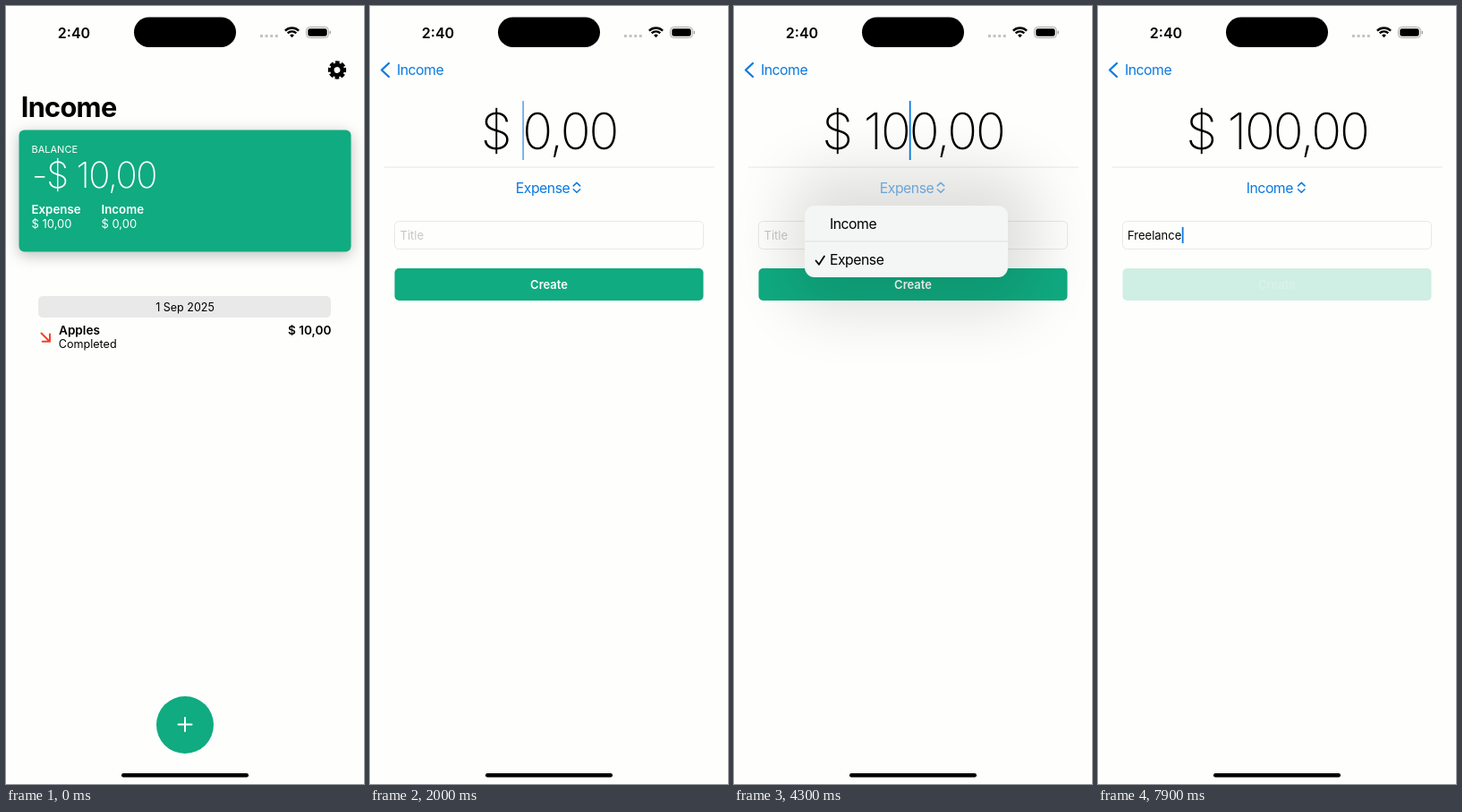
Write an HTML page that moves like this. It is 400x869 px and loops after 8000 ms.

```html
<!DOCTYPE html>
<html lang="en">
<head>
<meta charset="utf-8">
<title>Adding an income</title>
<style>
html, body { margin: 0; height: 100%; overflow: hidden; background: #fefefc; }
svg { display: block; width: 100vw; height: 100vh; }
text { font: 13px Inter, "Liberation Sans", sans-serif; white-space: pre; }
.semi { font-weight: 600; }
.body { font-size: 15.8px; letter-spacing: -.5px; }
.thin { font-weight: 200; letter-spacing: -.036em; }
.mid { text-anchor: middle; }
.end { text-anchor: end; }
.line { fill: none; stroke-linecap: round; stroke-linejoin: round; }
.green { fill: #10ab80; }
.blue { fill: #0a7ae0; }
.blueLine { stroke: #0a7ae0; }
#card { filter: drop-shadow(0 4px 8px rgba(0, 0, 0, .25)); }
#glow { filter: blur(34px); }
</style>
</head>
<body>
<svg viewBox="0 0 400 869">
  <g id="list">
    <rect id="listBack" width="520" height="869"/>
    <rect id="card" class="green" x="14.5" y="138.5" width="371" height="136" rx="6"/>
    <g fill="#fff">
      <text x="28.5" y="163.5" style="font-size:11px">BALANCE</text>
      <text class="thin" x="28.8" y="203" style="font-size:40px;font-weight:250">-$ 10,00</text>
      <text class="semi" x="28.5" y="232" style="font-size:13.3px">Expense</text>
      <text class="semi" x="106.5" y="232" style="font-size:13.3px">Income</text>
      <text x="28.5" y="248">$ 10,00</text>
      <text x="106.5" y="248">$ 0,00</text>
    </g>
    <rect id="dateBack" x="36" y="324" width="327" height="24" rx="5"/>
    <text class="mid" x="200" y="340.5" style="font-size:12.5px">1 Sep 2025</text>
    <path class="line" d="M39.5 365.5l9 9M49 366.5v8.3h-8.3" stroke="#f4422c" stroke-width="2"/>
    <text class="semi" x="59" y="367" style="font-size:13.6px">Apples</text>
    <text x="58.7" y="382" style="font-size:12.6px">Completed</text>
    <text class="semi end" x="363.5" y="367" style="font-size:13.6px">$ 10,00</text>
    <circle class="green" cx="200" cy="803" r="32"/>
    <path id="plus" class="line" d="M192.5 802.5h15M200 795v15" stroke="#fff" stroke-width="2"/>
  </g>

  <g id="form">
    <rect width="400" height="869" fill="#fefefc"/>
    <text id="amount" class="thin mid" x="200" y="159.5" style="font-size:56px"></text>
    <rect id="amountCaret" class="blue" y="106" width="1.8" height="66"/>
    <path d="M16 180H385" stroke="#e6e6e4"/>
    <g id="picker">
      <text id="kind" class="body blue" y="208.5"></text>
      <path id="arrows" class="line blueLine" d="M-3.7-1.9L0-5.4 3.7-1.9M-3.7 1.9L0 5.4 3.7 1.9" stroke-width="1.5"/>
    </g>
    <rect x="27.5" y="240.5" width="345" height="31" rx="5" fill="none" stroke="#e8e8e6"/>
    <text id="hint" x="33.5" y="260.5" fill="#c6c6c5">Title</text>
    <text id="title" x="33" y="260.5"></text>
    <rect id="titleCaret" class="blue" y="247" width="1.8" height="18"/>
    <rect id="button" x="27.5" y="293" width="345" height="36" rx="5"/>
    <text id="create" class="semi mid" x="200" y="316">Create</text>
    <rect id="glow" x="62" y="185" width="276" height="156" rx="40"/>
    <g id="menu">
      <rect x="79" y="223" width="227" height="80" rx="11" fill="#f4f5f5"/>
      <path d="M79 263H306" stroke="#e0e1e1"/>
      <text class="body" x="107" y="249">Income</text>
      <text class="body" x="107" y="289">Expense</text>
      <path class="line" d="M91.5 284.5l3.4 4.2 6-9.2" stroke="#000" stroke-width="1.8"/>
    </g>
  </g>

  <g id="gear" transform="translate(370 71.5) rotate(-15.1)" fill="none" stroke="#000">
    <circle r="5.7" stroke-width="4.6"/>
    <circle r="8.7" stroke-width="3" stroke-dasharray="4.6 2.233"/>
  </g>
  <path id="back" class="line blueLine" d="M21 64L13 71.5 21 79" stroke-width="2.3"/>
  <text id="bigName" style="font-size:30.7px;font-weight:700;letter-spacing:-.7px">Income</text>
  <text id="backName" class="body blue">Income</text>

  <text class="semi mid" x="76" y="35.5" style="font-size:16px">2:40</text>
  <rect x="143" y="12.5" width="114" height="33.5" rx="16.75"/>
  <path d="M284 33.5H304" stroke="#c4c4c2" stroke-width="3" stroke-dasharray="3 2.6"/>
  <path d="M311.9 27.6A10.8 10.8 0 0 1 327.1 27.6M314.7 30.4A6.8 6.8 0 0 1 324.3 30.4" fill="none" stroke="#000" stroke-width="2.4"/>
  <path d="M319.5 35.2L317.1 32.8A3.4 3.4 0 0 1 321.9 32.8Z"/>
  <rect x="335.5" y="23.5" width="25" height="12" rx="4" fill="none" stroke="#a8a8a6"/>
  <rect x="337.3" y="25.2" width="21.4" height="8.6" rx="2.4"/>
  <path d="M362.3 27.7v3.6" stroke="#a8a8a6" stroke-width="1.4"/>
  <rect id="home" x="129" y="857" width="142" height="4.5" rx="2.25"/>
</svg>
<script>
const LOOP = 8000;
const ui = Object.fromEntries([...document.querySelectorAll("svg [id]")].map(e => [e.id, e]));

const clamp = v => Math.min(1, Math.max(0, v));
const ramp = (t, from, to) => clamp((t - from) / (to - from));
const mix = (a, b, k) => a + (b - a) * k;
const mixColor = (a, b, k) => `rgb(${a.map((v, i) => Math.round(mix(v, b[i], k)))})`;
// Critically damped spring from 0 to 1.
const spring = (t, start, rate) => {
  const k = Math.max(0, t - start) * rate;
  return 1 - (1 + k) * Math.exp(-k);
};
const set = (el, attrs) => {
  for (const name in attrs) el.setAttribute(name, attrs[name]);
};
const write = (el, text) => {
  if (el.textContent !== text) el.textContent = text;
};

function drawPush(t) {
  const push = spring(t, 542, .0185);
  const name = spring(t, 551, .0185);
  set(ui.list, { transform: `translate(${-120 * push})` });
  set(ui.form, { transform: `translate(${400 * (1 - push)})` });
  const dim = Math.sqrt(push);
  set(ui.listBack, { fill: mixColor([254, 254, 252], [230, 230, 229], dim) });
  set(ui.dateBack, { fill: mixColor([233, 233, 233], [210, 210, 211], dim) });
  set(ui.plus, { opacity: mix(1, .4, ramp(t, 450, 500)) });
  set(ui.gear, { opacity: clamp(1 - push * .8 - ramp(push, .5, .9)) });
  set(ui.back, { opacity: ramp(push, .4, .95) });

  const place = `translate(${mix(16.8, 30, name)} ${mix(124, 77, name)})`;
  const size = mix(1, .49, name);
  set(ui.bigName, {
    transform: `${place} scale(${size})`,
    fill: mixColor([0, 0, 0], [60, 110, 190], ramp(name, 0, .6)),
    opacity: 1 - ramp(name, .4, .9)
  });
  set(ui.backName, { transform: `${place} scale(${size / .49})`, opacity: ramp(name, .4, .9) });
  set(ui.home, { fill: t > 540 && t < 1600 ? "#555" : "#000" });
}

function drawAmount(t) {
  const typed = (t >= 2700) + (t >= 3100);
  write(ui.amount, "$ " + "10".slice(0, typed) + "0,00");
  set(ui.amountCaret, {
    x: ui.amount.getStartPositionOfChar(2 + typed).x,
    opacity: t < 4900 ? ramp(t, 1850, 2100) : 0
  });
}

function drawMenu(t) {
  const open = spring(t, 3500, .014) * (1 - spring(t, 4380, .02));
  const scale = mix(.2, 1, open);
  set(ui.menu, {
    transform: `translate(200 213) scale(${scale}) translate(-200 -213)`,
    opacity: clamp(open * 1.6 - .1)
  });
  set(ui.glow, { opacity: .12 * open });
  set(ui.picker, { opacity: 1 - .45 * open });

  const income = t >= 4500;
  write(ui.kind, income ? "Income" : "Expense");
  set(ui.kind, { x: income ? 165.8 : 162.8 });
  set(ui.arrows, { transform: `translate(${income ? 227.3 : 231} 202.8)` });
}

function drawTitle(t) {
  const typed = t < 5400 ? 0 : t < 5800 ? 1 : 2 + Math.floor((t - 5800) / 100);
  write(ui.title, "Freelance".slice(0, typed));
  set(ui.hint, { opacity: typed ? 0 : 1 });
  const blink = 1 - ramp(t, 7050, 7300) + ramp(t, 7420, 7600);
  set(ui.titleCaret, {
    x: 33.5 + ui.title.getComputedTextLength(),
    opacity: t < 4900 ? 0 : blink
  });
}

function drawButton(t) {
  const pressed = t >= 7900;
  set(ui.button, { fill: pressed ? "#cfeee4" : "#10ab80" });
  set(ui.create, { fill: pressed ? "#daf2ea" : "#fff" });
}

function frame() {
  const t = performance.now() % LOOP;
  for (const draw of [drawPush, drawAmount, drawMenu, drawTitle, drawButton]) draw(t);
  requestAnimationFrame(frame);
}
frame();
</script>
</body>
</html>
```
